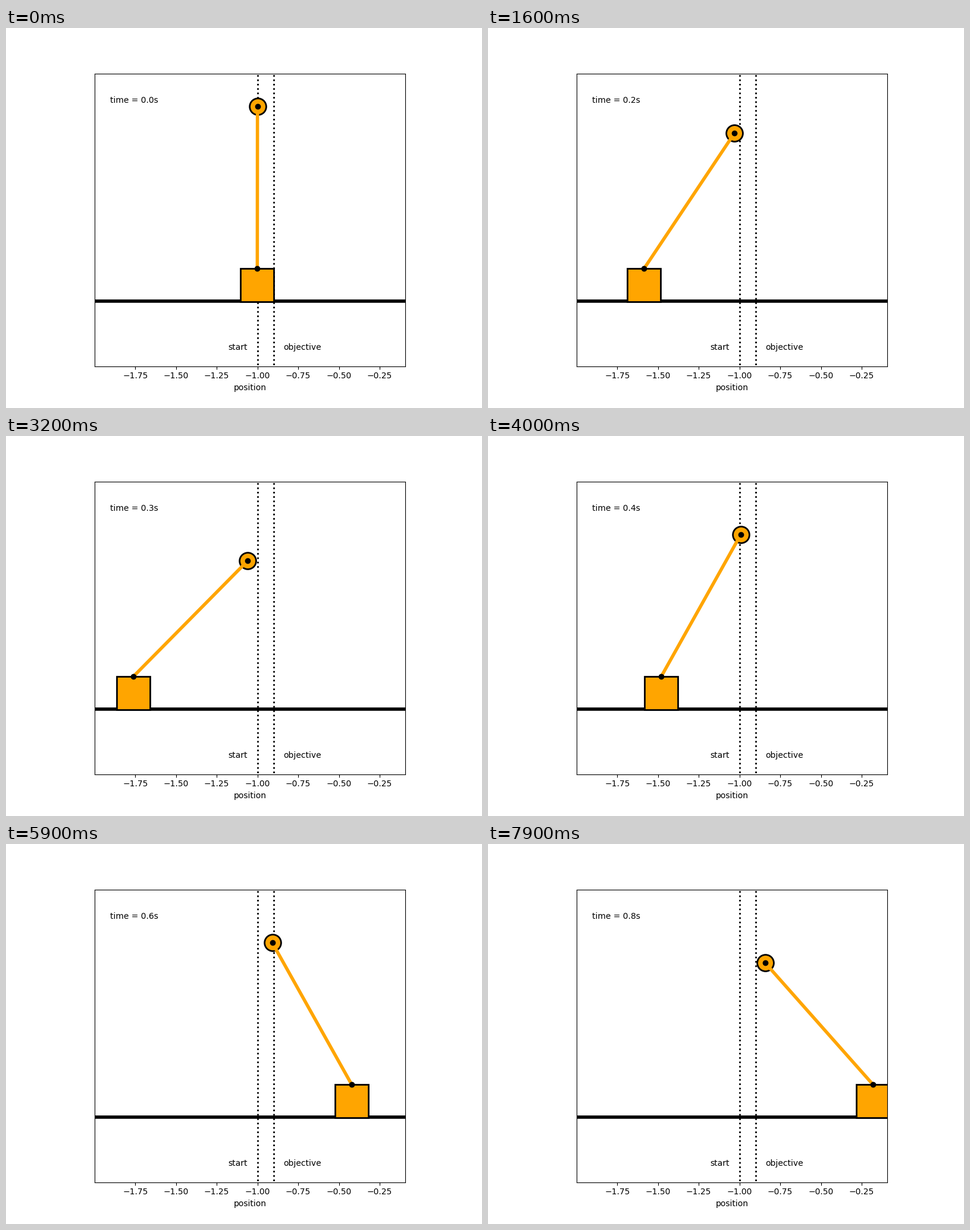
A matplotlib script for the animation above (8 s loop, 800 by 640 pixels).

```python
import numpy as np
import matplotlib.pyplot as plt
from matplotlib.animation import FuncAnimation

FRAMES = 80
STEPS = 100
START, GOAL = -1.0, -0.9
MASS_RATIO = 10 / 11


def travel(s):
    """Minimum-effort path from start to goal, smooth to the third derivative."""
    return START + (GOAL - START) * s**4 * (35 - 84 * s + 70 * s**2 - 20 * s**3)


def tilt(s):
    """Pole angle that produces the acceleration of the path."""
    return (GOAL - START) * 420 * s**2 * (1 - s)**2 * (1 - 2 * s) / MASS_RATIO


fig = plt.figure(figsize=(8, 6.4), dpi=100)
ax = fig.add_subplot(111, aspect="equal", autoscale_on=False,
                     xlim=(-1.9995, -0.0929), ylim=(-0.6, 1.2))
ax.set_xlabel("position")
ax.get_yaxis().set_visible(False)

ax.plot([-2.5, 0.5], [-0.2, -0.2], "k-", lw=4)
for x in (START, GOAL):
    ax.plot([x, x], [-1.5, 1.5], "k:", lw=2)
ax.text(START - 0.06, -0.5, "start", ha="right")
ax.text(GOAL + 0.06, -0.5, "objective", ha="left")

body = dict(linestyle="None", color="orange", markeredgecolor="k", markeredgewidth=2)
cart, = ax.plot([], [], marker="s", markersize=40, **body)
bob, = ax.plot([], [], marker="o", markersize=20, **body)
pole, = ax.plot([], [], "o-", color="orange", lw=4, markersize=6,
                markeredgecolor="k", markerfacecolor="k")
clock = ax.text(0.05, 0.9, "", transform=ax.transAxes)


def draw(i):
    angle = tilt((i + 0.5) / STEPS)
    x = travel(i / STEPS) - angle
    tip_x, tip_y = x + np.sin(angle), np.cos(angle)
    cart.set_data([x], [-0.1])
    bob.set_data([tip_x], [tip_y])
    pole.set_data([x, tip_x], [0, tip_y])
    clock.set_text(f"time = {(i + 1) / STEPS:.1f}s")
    return cart, bob, pole, clock


anim = FuncAnimation(fig, draw, frames=FRAMES, init_func=lambda: draw(0),
                     interval=100, repeat=True, repeat_delay=0)
plt.show()
```
